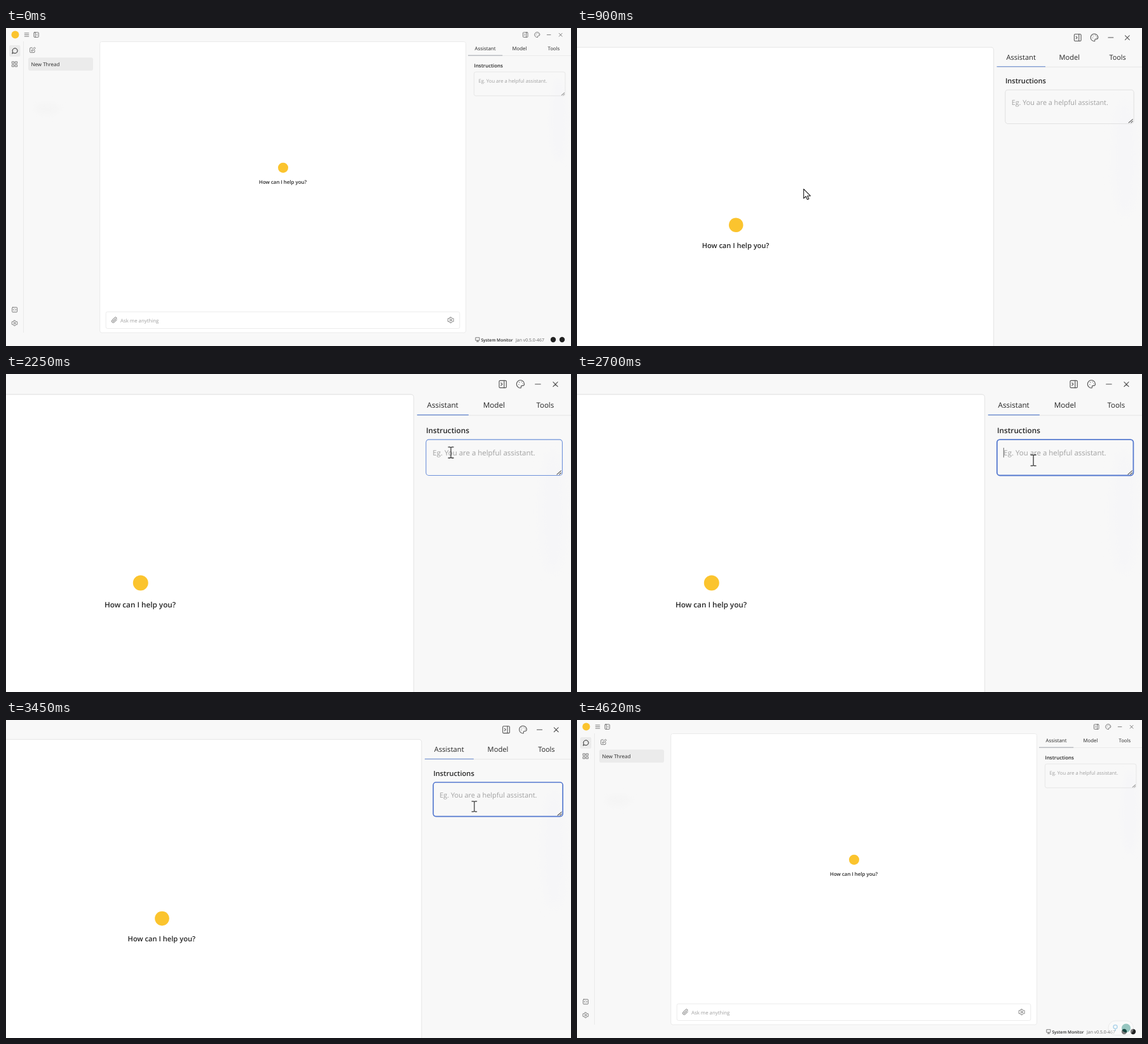
Recreate the animation shown at these times as an HTML page. Size 889 by 500 pixels, loop 4650 ms.

```html
<!DOCTYPE html>
<html lang="en">
<head>
<meta charset="utf-8">
<title>Assistant instructions</title>
<style>
  html, body { margin: 0; width: 100%; height: 100%; overflow: hidden; background: #f8f8f8; }
  svg { display: block; width: 100vw; height: 100vh; }
  text { font: 7.85px "Open Sans", "Noto Sans", sans-serif; fill: #262626; text-rendering: geometricPrecision; }
  .mid { text-anchor: middle; }
  .medium { font-weight: 500; }
  .semi { font-weight: 600; }
  .hint { fill: #a0a0a0; }
  .line { fill: none; stroke: #e6e6e6; stroke-width: .75; }
  .icon { fill: none; stroke: #555; stroke-width: .75; stroke-linecap: round; stroke-linejoin: round; }
  .pointer { fill: #fff; stroke: #222; stroke-width: .8; stroke-linejoin: round; }
</style>
</head>
<body>
<svg viewBox="0 0 889 500">
  <defs>
    <g id="gear">
      <path d="M-1-4.3H1L1.5-3 2.7-2.3 4-2.6 4.8-.9 3.9 0 4.8.9 4 2.6 2.7 2.3 1.5 3 1 4.3H-1L-1.5 3-2.7 2.3-4 2.6-4.8.9-3.9 0-4.8-.9-4-2.6-2.7-2.3-1.5-3Z"/>
      <circle r="1.4"/>
    </g>
    <g id="sidePanel">
      <rect x="-3.8" y="-3.8" width="7.6" height="7.6" rx="1"/>
      <path d="M-1.4-3.8V3.8M1.9-1.4L.5 0 1.9 1.4"/>
    </g>
    <filter id="soft"><feGaussianBlur stdDeviation="5"/></filter>
  </defs>

  <g id="camera">
    <rect width="889" height="500" fill="#f8f8f8"/>
    <g filter="url(#soft)">
      <ellipse cx="65" cy="127" rx="20" ry="9" fill="#f5f5f5"/>
      <ellipse cx="870" cy="145" rx="13" ry="65" fill="#f6f6f8"/>
    </g>

    <path class="line" d="M27.5 21V479M727 43.5H889"/>
    <rect x="5" y="27" width="17.5" height="18" rx="2.5" fill="#ebebeb"/>
    <rect x="35" y="46.5" width="102" height="20.5" rx="3" fill="#ebebeb"/>
    <rect class="line" x="147.7" y="21.5" width="575.8" height="457.5" rx="3" style="fill:#fff"/>
    <rect class="line" x="157.2" y="446.3" width="556.6" height="26.2" rx="2.5"/>

    <g fill="#fbc42e">
      <circle cx="14.5" cy="10.5" r="6"/>
      <circle cx="436" cy="219.7" r="8"/>
    </g>

    <g class="icon">
      <path d="M29.2 8H35.8M29.2 10.6H35.8M29.2 13.2H35.8"/>
      <use href="#sidePanel" x="47.6" y="10.7"/>
      <use href="#sidePanel" transform="translate(817.2 10.7) scale(-1 1)"/>
      <path d="M9.9 39.8L10.5 37.6A4 4 0 1 1 12.1 39.3Z" stroke="#222" stroke-width="1"/>
      <path d="M9.7 52.9h3v3h-3zM14.6 52.9h3v3h-3zM9.7 57.8h3v3h-3zM14.6 57.8h3v3h-3z"/>
      <path d="M41.3 31H38.6Q37.7 31 37.7 32V37.6Q37.7 38.6 38.6 38.6H44Q45 38.6 45 37.6V35M40.3 36.2L40.8 34.2 44.8 30.2 46.3 31.7 42.3 35.7Z"/>
      <rect x="9.7" y="439.2" width="7.8" height="7.6" rx="1"/>
      <path d="M12.6 441.8L11.4 443 12.6 444.2M14.6 441.8L15.8 443 14.6 444.2"/>
      <use href="#gear" transform="translate(13.5 464) scale(.95)"/>
      <use href="#gear" transform="translate(699.7 459.2)"/>
      <path d="M174.4 458.8L170.5 462.7Q168.6 464.1 167 462.7 165.5 461 167 459.2L171.3 455Q172.6 454.2 173.6 455.2 174.5 456.3 173.6 457.4L169.6 461.3Q169 461.7 168.5 461.2 168.2 460.7 168.6 460.1L172.1 456.6"/>
      <path d="M836.3 14.7A4.1 4.1 0 1 1 839.9 10.7Q839.7 12.5 837.8 12.3 836.2 12.2 836.5 13.5ZM834 11h.1M834.5 8.8h.1M836.8 8.4h.1M838.3 10h.1"/>
      <path d="M851.3 10.7H857M870.2 8.4L875 13.2M875 8.4L870.2 13.2"/>
      <path d="M739.2 486.8H745V491.2H739.2ZM742.1 491.2V493M740.5 493H743.7"/>
    </g>

    <text class="medium" x="39.5" y="60" style="font-size:8px">New Thread</text>
    <text class="mid semi" x="435.5" y="245.3">How can I help you?</text>
    <text class="hint" x="180" y="463">Ask me anything</text>
    <text class="mid" x="754" y="35.3">Assistant</text>
    <text class="mid" x="808" y="35.3">Model</text>
    <text class="mid" x="861.8" y="35.3" style="font-size:7.7px">Tools</text>
    <text class="semi" x="736.5" y="61.9">Instructions</text>
    <path id="underline" d="M727 43.1H781.2" stroke-width=".75"/>

    <rect id="field" x="736.4" y="69" width="143.5" height="37.7" rx="3" fill="none"/>
    <path class="icon" d="M874.2 105.6L878.6 101.8M876.8 105.6L878.6 104"/>
    <text class="hint" x="743.4" y="85.6" style="font-size:7.66px">Eg. You are a helpful assistant.</text>
    <path id="caret" d="M743.4 77.6V87.8" stroke="#555" stroke-width=".6"/>

    <text class="semi" x="747.5" y="492.5" style="font-size:6.55px">System Monitor</text>
    <text x="802" y="492.5" style="font-size:6.95px;fill:#666">Jan v0.5.0-467</text>
    <g fill="#222">
      <circle cx="861" cy="490" r="4.2"/>
      <circle cx="875" cy="490" r="4.2"/>
    </g>

    <g id="badge">
      <g id="pill">
        <rect x="836" y="473" width="39.5" height="22.5" rx="11" fill="#fff" stroke="#ccc" stroke-width=".8"/>
        <circle cx="847" cy="482.5" r="3" fill="none" stroke="#4aa3d8" stroke-width="1.5"/>
        <path d="M847 486V489" stroke="#4aa3d8" stroke-width="1.5"/>
      </g>
      <circle id="dot" cx="864" cy="484.4" fill="#087d6e"/>
    </g>

    <g id="cursor">
      <path id="arrow" class="pointer" d="M0 0V10.4L2.5 8.2 4.1 11.7 5.8 11 4.2 7.6H7.5Z"/>
      <path id="hand" class="pointer" d="M-.8.3Q.2-.8 1.1.3V5.1L1.2 3.8Q2.4 3 3.2 4L3.3 5.2 3.6 4.3Q4.8 3.7 5.4 4.8V5.8Q6.7 4.7 7.2 6.2V9.8Q6.9 12.2 5.5 13.7H-.1Q-1.1 11.4-3.9 8.9-4.4 7.3-2.6 7.4L-.8 8.8Z"/>
      <path id="beam" fill="none" stroke="#333" stroke-width=".85" d="M-3-5.7H-.9L0-5.2 .9-5.7H3M0-5.2V5.2M-3 5.7H-.9L0 5.2 .9 5.7H3"/>
    </g>
  </g>
</svg>

<script>
const LOOP = 4650, WIDTH = 889, ZOOM = 1.495;
const FOCUS = 2665, BLUR = 4560, BLINK = 530;
const el = id => document.getElementById(id);
const set = (id, attrs) => {
  for (const name in attrs) el(id).setAttribute(name, attrs[name]);
};
const show = (id, visible) => set(id, { opacity: +visible });

const progress = (t, start, end) => Math.min(1, Math.max(0, (t - start) / (end - start)));
const smooth = p => p * p * (3 - 2 * p);
const cubic = p => p < .5 ? 4 * p ** 3 : 1 - 4 * (1 - p) ** 3;

// time, x, y in unzoomed coordinates
const path = [
  [0, 328, 281], [540, 438, 219.5], [720, 439, 219.3], [1320, 771.3, 37.2], [1600, 770, 34],
  [1840, 770, 34], [2250, 762.6, 82.6], [2420, 762.6, 82.6], [2900, 781.9, 95.7]
];

function cursorAt(t) {
  let [, x, y] = path[0];
  for (let i = 1; i < path.length; i++) {
    const p = smooth(progress(t, path[i - 1][0], path[i][0]));
    x += (path[i][1] - path[i - 1][1]) * p;
    y += (path[i][2] - path[i - 1][2]) * p;
  }
  return [x, y];
}

function draw(t) {
  const scale = 1 + (ZOOM - 1) * (cubic(progress(t, 550, 1090)) - cubic(progress(t, 3270, 3810)));
  set('camera', { transform: `translate(${WIDTH * (1 - scale)} 0) scale(${scale})` });
  set('underline', { stroke: scale < 1.01 ? '#858b95' : '#5f83cc' });

  const [x, y] = cursorAt(t);
  const overField = x > 736 && y > 69 && y < 107;
  const overTab = x > 727 && y < 44;
  set('cursor', {
    transform: `translate(${x} ${y})`,
    opacity: t < 30 ? 0 : 1 - progress(t, 3480, 3600)
  });
  show('arrow', !overField && !overTab);
  show('hand', overTab);
  show('beam', overField);

  const focused = t >= FOCUS && t < BLUR;
  const hovered = overField && t < FOCUS;
  set('field', {
    stroke: focused ? '#5579cf' : hovered ? '#6f92da' : '#e1e1e1',
    'stroke-width': focused ? 1.2 : .75
  });
  show('caret', focused && Math.floor((t - FOCUS) / BLINK) % 2 === 0);

  show('pill', t >= BLUR);
  set('dot', { r: t < BLUR ? 10.8 : 7 });
  set('badge', { opacity: t < FOCUS ? 0 : t < BLUR ? 1 : t < 4620 ? .7 : .4 });
}

function frame() {
  draw(performance.now() % LOOP);
  requestAnimationFrame(frame);
}
frame();
</script>
</body>
</html>
```
